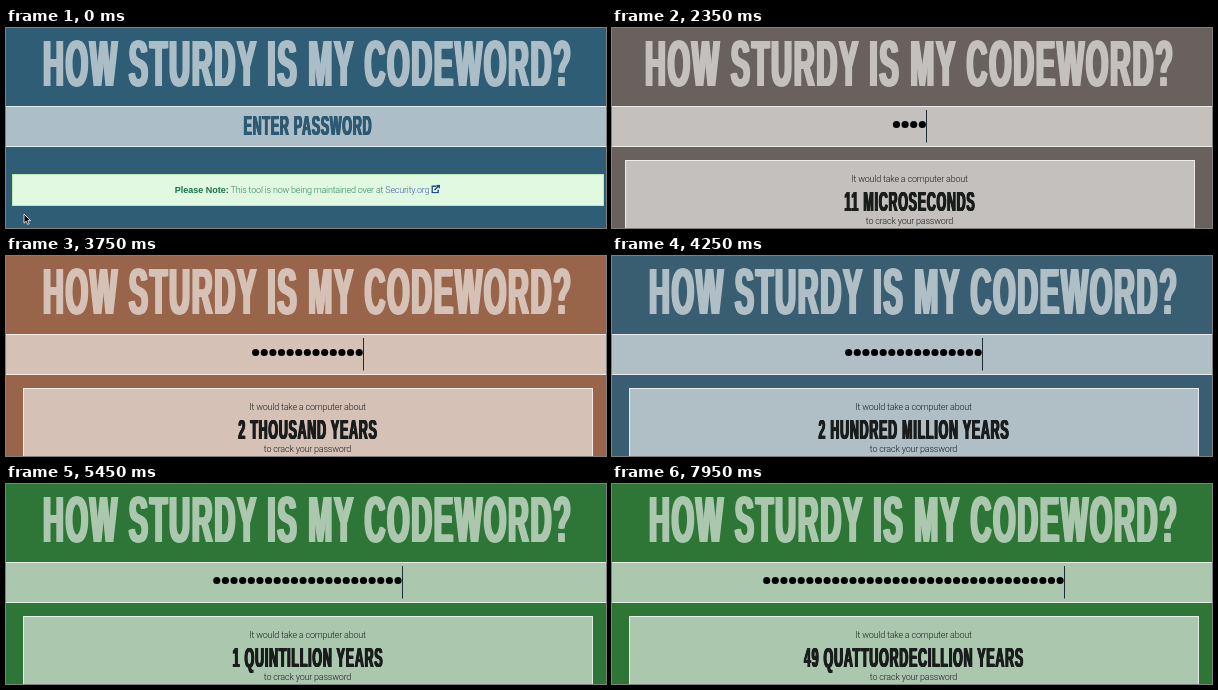
Animation of 600 by 200 pixels, one loop 8000 ms. Source, as an HTML page:

```html
<!DOCTYPE html>
<html lang="en">
<head>
<meta charset="utf-8">
<title>Password strength</title>
<style>
  html, body { margin: 0; width: 100%; height: 100%; overflow: hidden; }
  #stage { position: relative; width: 600px; height: 200px; overflow: hidden; background: #2f5d75; }
  #stage div, #stage svg { position: absolute; }
  #page { inset: 0; }
  .text { left: 301.5px; white-space: nowrap; line-height: 1.2; transform: translate(-50%, -50%); }
  .gothic {
    font: bold 28px/1.2 "Liberation Sans", Arial, sans-serif;
    letter-spacing: .07em;
    text-shadow: -.05em 0, -.025em 0, .025em 0, .05em 0;
    transform: translate(-50%, -50%) scaleX(.439);
  }
  .light { font: 300 9px/1.2 Roboto, "Liberation Sans", sans-serif; letter-spacing: -.2px; color: #1c1f1e; }
  #title { left: 302.3px; top: 35.5px; font-size: 65px; color: #fff; opacity: .6; }
  #field { left: -2px; width: 604px; top: 78px; height: 39px; }
  #panel { left: 17px; width: 568px; top: 132px; height: 90px; }
  #field, #panel { background: rgba(255, 255, 255, .6); border: 1px solid rgba(255, 255, 255, .7); }
  #hint { top: 97.5px; color: #2d5a72; }
  #result { top: 174px; color: #191d1b; }
  #note { left: 6px; width: 590px; top: 145.5px; height: 30px; background: #e0f9e0; border: 1px solid #bfe8b4; }
  #noteText { top: 161.5px; color: #2f8560; }
  #noteText b { font: bold 9px "Liberation Sans", Arial, sans-serif; letter-spacing: 0; color: #1c7049; }
  #noteText span { color: #3d5fb0; }
  #noteText svg { position: static; vertical-align: -1px; }
  #overlay { left: 0; top: 0; }
</style>
</head>
<body>
<div id="stage">
  <div id="field"></div>
  <div id="page">
    <div id="title" class="text gothic">HOW STURDY IS MY CODEWORD?</div>
    <div id="hint" class="text gothic">ENTER PASSWORD</div>
    <div id="notice">
      <div id="note"></div>
      <div id="noteText" class="text light"><b>Please Note:</b> This tool is now being maintained over at <span>Security.org</span>
        <svg width="9" height="9" viewBox="0 0 9 9" fill="none" stroke="#23498f" stroke-width="1.4"><path d="M5 1.7H1V8h6V5.2M3.4 5.5 7.8 1M5.3 .9h2.8v2.8"/></svg></div>
    </div>
    <div id="answer">
      <div id="panel"></div>
      <div class="text light" style="top:150.5px">It would take a computer about</div>
      <div id="result" class="text gothic"></div>
      <div class="text light" style="top:192.5px">to crack your password</div>
    </div>
    <svg id="overlay" width="600" height="200">
      <line id="dots" y1="96.5" y2="96.5" stroke="#000" stroke-width="7.2" stroke-linecap="round"/>
      <rect id="caret" y="82" width="1" height="32.5" fill="#1d2b33"/>
      <path id="arrow" d="M0 0V9.2L2.2 7.2 3.7 10.4 5.2 9.7 3.8 6.6H6.6Z" fill="#000" stroke="#fff" stroke-width=".8"/>
    </svg>
  </div>
</div>
<script>
const LOOP = 8000, STEP = 50, PITCH = 8.63, MIDDLE = 302;
const GUESSES_PER_SECOND = 4e10;
const $ = id => document.getElementById(id);

// [time, typed characters]
const typing = [[1980, 1], [2320, 4], [3120, 9], [4200, 16], [5400, 22], [7900, 35], [8000, 35]];
const units = [['year', 31557600], ['month', 2629800], ['week', 604800], ['day', 86400], ['hour', 3600],
  ['minute', 60], ['second', 1], ['millisecond', 1e-3], ['microsecond', 1e-6], ['nanosecond', 1e-9], ['picosecond', 1e-12]];
const scales = ['', 'thousand', 'million', 'billion', 'trillion', 'quadrillion', 'quintillion', 'sextillion',
  'septillion', 'octillion', 'nonillion', 'decillion', 'undecillion', 'duodecillion', 'tredecillion', 'quattuordecillion'];

function typedCount(t) {
  if (t < typing[0][0]) return 0;
  const i = typing.findIndex(([time]) => time > t);
  const [t0, n0] = typing[i - 1], [t1, n1] = typing[i];
  return Math.floor(n0 + (n1 - n0) * (t - t0) / (t1 - t0));
}

function crackTime(n) {
  const alphabet = n < 5 ? 26 : n < 29 ? 45 : 71;
  const seconds = alphabet ** n / GUESSES_PER_SECOND;
  const [unit, size] = units.find(([, s]) => seconds >= s);
  const amount = seconds / size;
  const power = Math.floor(Math.log10(amount) / 3);
  const lead = amount / 1000 ** power;
  const words = lead >= 100 ? [Math.floor(lead / 100), 'hundred'] : [Math.floor(lead)];
  if (power) words.push(scales[power]);
  words.push(Math.floor(amount) === 1 ? unit : unit + 's');
  return words.join(' ').toUpperCase();
}

function timeline(el, frames) {
  const animation = el.animate(frames.map(([time, style, easing = 'linear']) =>
    ({ offset: time / LOOP, easing, ...style })), { duration: LOOP, fill: 'both' });
  animation.pause();
  return animation;
}

const paint = color => ({ backgroundColor: color });
const move = (x, y) => ({ transform: `translate(${x}px, ${y}px)` });
const blue = paint('#2f5d75'), orange = paint('#b06640'), green = paint('#2e7636');

const timelines = [
  timeline($('stage'), [[0, blue], [2080, blue, 'ease'], [3080, orange], [3600, orange, 'ease'],
    [4600, blue, 'ease'], [5600, green], [LOOP, green]]),
  timeline($('arrow'), [[0, move(18, 186)], [300, move(18, 186), 'ease-in'], [875, move(48, 159)],
    [1500, move(300, 100)], [LOOP, move(300, 100)]]),
  // a scrollbar briefly narrows the page
  timeline($('page'), [[0, move(0, 0), 'steps(1)'], [1980, move(-4, 0), 'steps(1)'],
    [2500, move(0, 0)], [LOOP, move(0, 0)]])
];

const show = (id, on) => { $(id).style.visibility = on ? 'visible' : 'hidden'; };

function draw(now) {
  const t = Math.floor(now % LOOP / STEP) * STEP;
  const n = typedCount(t), half = n * PITCH / 2;
  timelines.forEach(a => { a.currentTime = t; });

  show('hint', !n);
  show('notice', !n);
  show('answer', n);
  show('dots', n);
  show('caret', t >= 1700);
  show('arrow', t < 1350);
  $('caret').setAttribute('x', Math.round(MIDDLE + half - .9));
  if (n) {
    const first = MIDDLE - half + PITCH / 2 - .6;
    $('dots').setAttribute('x1', first);
    $('dots').setAttribute('x2', first + (n - 1) * PITCH + .1);
    $('dots').setAttribute('stroke-dasharray', `0 ${PITCH}`);
    $('result').textContent = crackTime(n);
  }
}

const start = performance.now();
function tick() {
  draw(performance.now() - start);
  requestAnimationFrame(tick);
}
tick();
</script>
</body>
</html>
```
